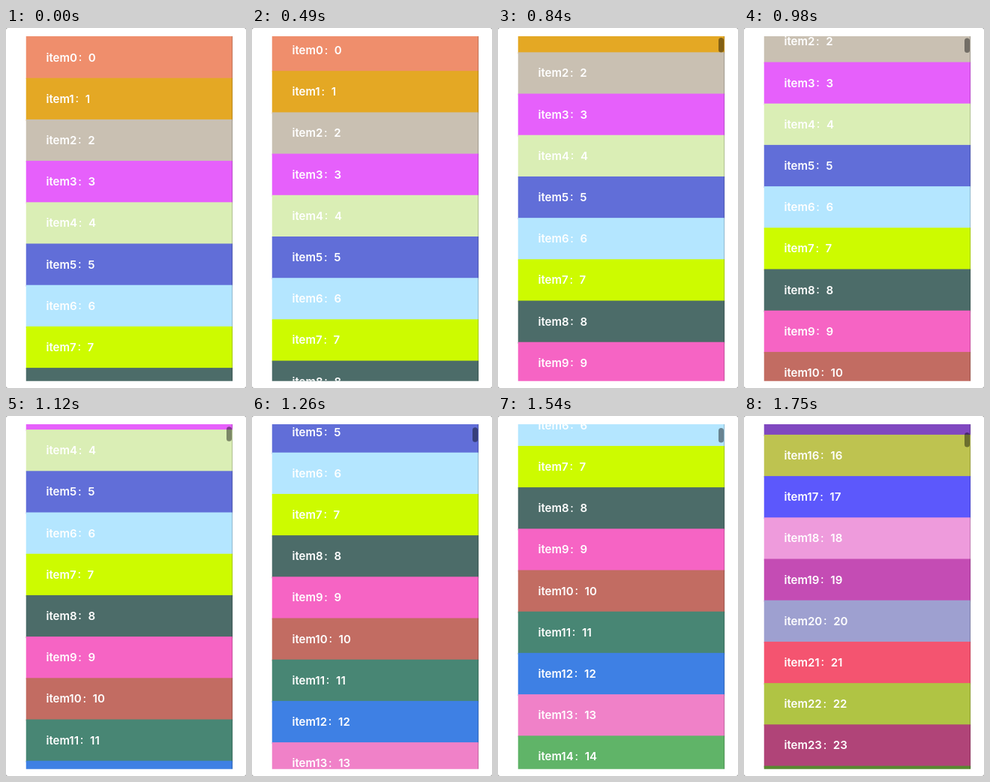
These frames come from a looping animation (320x480 px, 1820 ms). An HTML page with a canvas:

```html
<!DOCTYPE html>
<html lang="zh-CN">
<head>
<meta charset="utf-8">
<title>Scrolling list</title>
<style>
  html, body { margin: 0; width: 100%; height: 100%; overflow: hidden; background: #fff; }
  canvas { display: block; }
</style>
</head>
<body>
<canvas id="stage" width="320" height="480"></canvas>
<script>
const ctx = document.getElementById('stage').getContext('2d');
const LOOP = 1820, STEP = 70, ROW = 55.2;
const VIEW = { x: 26.5, y: 11, w: 275.8, h: 459.7 };
const FONT = '15px Inter, sans-serif';
const colors = `#ef8e6c #e4a824 #c9c0b2 #e660fb #daeeb5 #616ed8 #b4e6ff #cdfb00 #4c6c69
  #f664c4 #c26c62 #488674 #3e80e4 #f081c8 #60b468 #8048c0 #bec350 #5c58fc
  #ee9bdc #c44cb4 #9ea0d0 #f45470 #b0c444 #b04478 #588830`.split(/\s+/);

// Scroll distance at key times, joined by a monotone cubic.
const keys = [[0, 0], [350, 0], [490, 9.5], [700, 56.2], [980, 131.6],
              [1260, 294], [1540, 358], [1750, 869.8]];
const slopes = keys.slice(1).map(([t, s], i) => (s - keys[i][1]) / (t - keys[i][0]));
const tangents = keys.map((_, i) => {
  const a = slopes[i - 1] ?? slopes[i], b = slopes[i] ?? a;
  return a * b > 0 ? 2 * a * b / (a + b) : 0;
});

function scrollAt(time) {
  const i = Math.max(0, keys.findIndex(key => key[0] >= time) - 1);
  const [t0, s0] = keys[i], [t1, s1] = keys[i + 1];
  const d = t1 - t0, u = (time - t0) / d, v = 1 - u;
  return s0 * v * v * (1 + 2 * u) + s1 * u * u * (3 - 2 * u)
    + d * u * v * (tangents[i] * v - tangents[i + 1] * u);
}

function roundedBox(x, y, w, h, r, color) {
  ctx.fillStyle = color;
  ctx.beginPath();
  ctx.roundRect(x, y, w, h, r);
  ctx.fill();
}

// The colon sits at the left of a full-width cell.
function drawLabel(index, x, y) {
  const name = `item${index}`;
  ctx.fillStyle = '#fff';
  ctx.font = `600 ${FONT}`;
  const end = x + ctx.measureText(name).width;
  ctx.fillText(name, x, y);
  ctx.fillText(index, end + 15, y);
  ctx.font = `500 ${FONT}`;
  ctx.fillText(':', end + 1.8, y - 0.5);
}

function draw(time) {
  const scroll = scrollAt(time);
  ctx.fillStyle = '#999';
  ctx.fillRect(0, 0, 320, 480);
  roundedBox(0, 0, 320, 480, 3, '#fff');

  ctx.save();
  ctx.beginPath();
  ctx.rect(VIEW.x, VIEW.y, VIEW.w, VIEW.h);
  ctx.clip();
  colors.forEach((color, i) => {
    const y = VIEW.y + 0.5 + i * ROW - scroll;
    ctx.fillStyle = color;
    ctx.fillRect(VIEW.x, i ? y : y - 1, VIEW.w, ROW + 2);
    drawLabel(i, 53.5, y + 33);
  });
  ctx.fillStyle = 'rgba(0,0,0,.25)';
  ctx.fillRect(301.3, VIEW.y, 1, VIEW.h);
  if (time >= 560) roundedBox(294, 11.9 + scroll * 0.0115, 7, 19.5, 3.5, 'rgba(0,0,0,.43)');
  ctx.restore();
}

function frame() {
  draw(Math.floor(performance.now() % LOOP / STEP) * STEP);
  requestAnimationFrame(frame);
}
frame();
</script>
</body>
</html>
```
